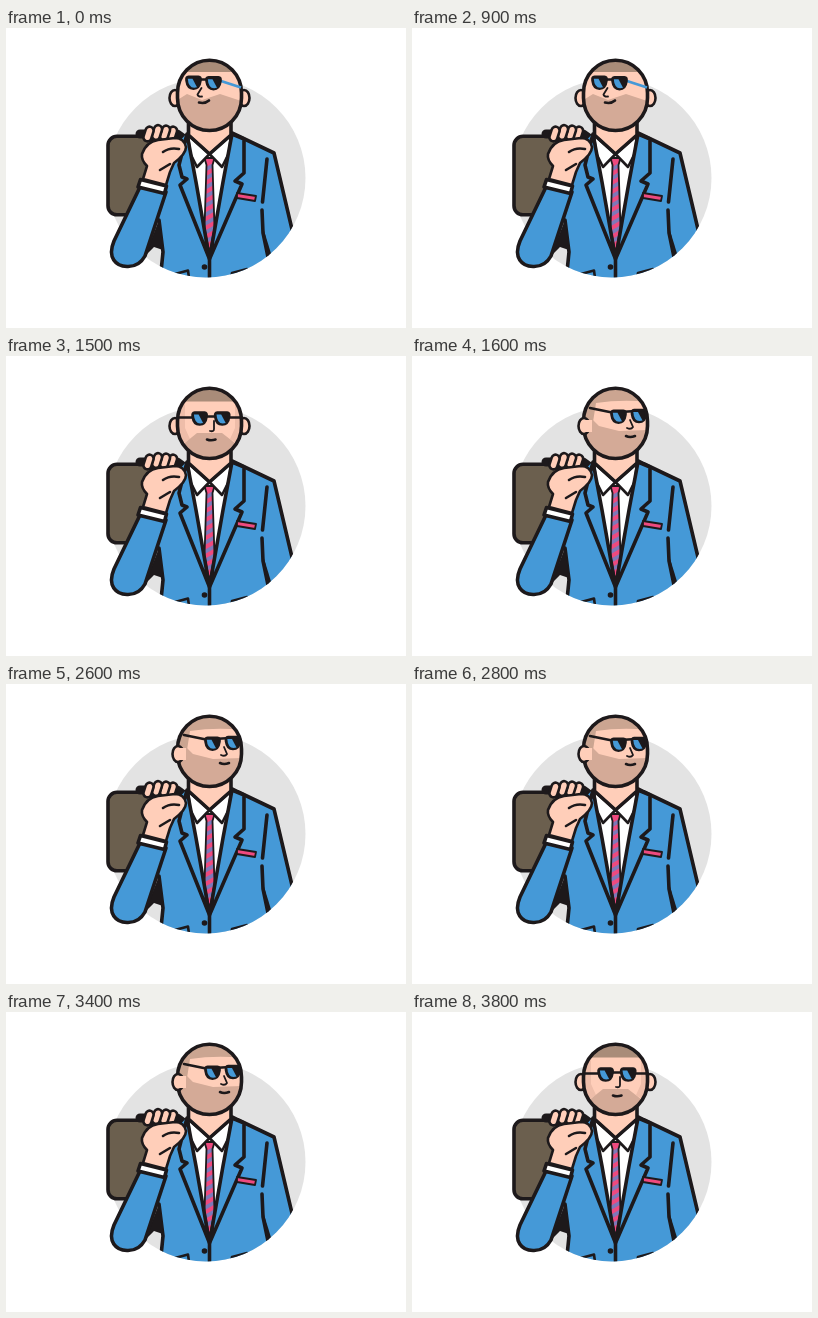
An HTML page for the animation above (3900 ms loop, 400x300 px).

```html
<!DOCTYPE html>
<html lang="en">
<head>
<meta charset="utf-8">
<title>Man in a blue suit</title>
<style>
html, body { margin: 0; width: 100%; height: 100%; overflow: hidden; background: #fff; }
svg { display: block; width: 100vw; height: 100vh; }
.ink { fill: none; stroke: #1d191b; stroke-width: 3.6; stroke-linecap: round; stroke-linejoin: round; }
.thin { stroke-width: 2.6; }
.fine { stroke-width: 1.8; }
.skin { fill: #ffceb9; }
.blue { fill: #4599d7; }
.white { fill: #fff; }
.black { fill: #1d191b; }
.case { fill: #6b5f4e; }
.pink { fill: #ee4a7f; }
.hair { fill: #a98c79; }
.stubble { fill: #cba591; }
.beard { fill: #d4aa97; }
.shade { fill: #eebda9; }
.pose { animation: 3.9s step-end infinite; }
.left { animation-name: left; }
.front { animation-name: front; visibility: hidden; }
.right { animation-name: right; visibility: hidden; }
.nod { animation: nod 3.9s step-end infinite; }
@keyframes left { 0% { visibility: visible } 38.4615%, 100% { visibility: hidden } }
@keyframes front {
  0%, 41.0256% { visibility: hidden }
  38.4615%, 97.4359%, 100% { visibility: visible }
}
@keyframes right {
  0%, 97.4359%, 100% { visibility: hidden }
  41.0256% { visibility: visible }
}
@keyframes nod {
  0%, 71.7949%, 100% { transform: none }
  66.6667% { transform: translateY(-1px) }
}
</style>
</head>
<body>
<svg viewBox="0 0 400 300">
  <defs>
    <path id="torso" d="M150 260V190L166 122L181 105H226L268 125L289 214V260Z"/>
    <path id="tie" d="M198.500 130H208.500L206.500 137L208.500 200L203.500 226L198.500 200L200.500 137Z"/>
    <path id="head" d="M171.500 65A32 32.800 0 0 1 235.500 65V70A32 32.500 0 0 1 171.500 70Z"/>
    <ellipse id="ear" class="ink skin thin" cy="70" rx="5.500" ry="8"/>
    <rect id="finger" class="ink thin skin" x="-4" y="-7.500" width="8" height="15" rx="4" transform="rotate(18)"/>
    <g id="lens">
      <path class="ink black thin" d="M-5 -6H5Q7.500 -6 7 -2Q6 6 0 6Q-6 6 -7 -2Q-7.500 -6 -5 -6Z"/>
      <path class="blue" d="M-5.700 -4H-1L3.500 4.500Q-5 7 -5.700 -4Z"/>
    </g>
    <clipPath id="discClip"><circle cx="200" cy="150" r="99.500"/></clipPath>
    <clipPath id="tieClip"><use href="#tie"/></clipPath>
    <clipPath id="headClip"><use href="#head"/></clipPath>
  </defs>

  <circle cx="200" cy="150" r="99.500" fill="#e3e3e3"/>

  <!-- briefcase -->
  <rect class="ink case" x="102" y="108.300" width="45" height="78.500" rx="9"/>
  <path class="ink" style="stroke-width:9" d="M134 106H171L178 111"/>

  <!-- jacket -->
  <g clip-path="url(#discClip)">
    <path class="blue" d="M154 260L157 224L152 192L166 122L181 105H226L268 125L289 214V260Z"/>
    <path class="ink" d="M226 105L268 125L289 214M261 131L256.500 174M256 182L257 205L263 234"/>
    <path class="black" d="M256 196L267 232L262 238Z"/>
    <path class="ink" d="M153 192L157 224L155 244M203.500 230V250"/>
    <path class="ink thin" d="M169 246L182 242.500L183 250M225 250L226 245L241 241"/>
    <path class="black" d="M153 192L139 228L148 219L157 222Z"/>
  </g>
  <circle class="black" cx="198.500" cy="239" r="2.800"/>

  <!-- shirt and tie -->
  <path class="white" d="M181 106L190 154L203.500 231L217 154L226 106Z"/>
  <path class="skin" d="M182.500 90H225V107L203.500 127L182.500 107Z"/>
  <use href="#tie" class="pink"/>
  <path clip-path="url(#tieClip)" fill="none" stroke="#7f78b8" stroke-width="3.800" d="M197 143L211 135M197 152L211 144M197 161L211 153M197 170L211 162M197 179L211 171M197 188L211 180M197 197L211 189M197 206L211 198M197 215L211 207"/>
  <use href="#tie" class="ink fine"/>
  <path class="ink thin white" d="M182 107L184 125L191 139L203.500 126ZM225 107L223 125L216 139L203.500 126Z"/>
  <path class="ink" d="M182.500 92V107L203.500 126L225 107V92"/>
  <path class="ink blue" d="M181 106L173 137L176 149L181 151L174 157L203.500 231L190 154ZM226 106L238 111V145L229 153L236 156L203.500 231L217 154Z"/>
  <path class="ink fine pink" d="M231 165L250 168L249 173L231 170Z"/>

  <!-- raised arm -->
  <path class="ink blue" d="M134 159L108 213C101 230 110 238 121 238.500Q133 239 139 228L160 164Z"/>
  <path class="ink white" d="M134.500 151.500L160.500 158L158.500 165.500L132 159Z"/>
  <use href="#finger" x="0" y="0" transform="translate(166 106)"/>
  <use href="#finger" transform="translate(159 105)"/>
  <use href="#finger" transform="translate(151 104.500)"/>
  <use href="#finger" transform="translate(142.500 106)"/>
  <path class="ink thin skin" d="M137 151L141 138Q135 132 136 126Q140 114 152 112L169 110Q178 110 180 119Q180 126 168 135L164 144L160 157Z"/>
  <path class="ink thin" d="M157 124Q164 119 173 121M154 142L164 136"/>

  <!-- head turned left -->
  <g class="pose left">
    <use href="#ear" x="169"/>
    <use href="#ear" x="238"/>
    <use href="#head" class="skin"/>
    <g clip-path="url(#headClip)">
      <path class="hair" d="M170 28H238V44H170Z"/>
      <path class="beard" d="M170 73L181 66L196 72L214 66L238 74V105H170Z"/>
    </g>
    <use href="#head" class="ink"/>
    <path fill="none" stroke="#4599d7" stroke-width="2.800" d="M215 53L235 59.500"/>
    <path class="ink thin" d="M194 51.500H202"/>
    <path class="skin" d="M195 61L191 67L196 70L200 62Z"/>
    <path class="ink fine" d="M195.500 60L191.500 66.500Q192 69 196 68.500"/>
    <path class="ink thin" d="M193 74.500Q199 76 203 72.500"/>
    <use href="#lens" x="187.500" y="54.700"/>
    <use href="#lens" x="207.500" y="55.200"/>
  </g>

  <!-- head facing forward -->
  <g class="pose front">
    <use href="#ear" x="169"/>
    <use href="#ear" x="238"/>
    <use href="#head" class="skin"/>
    <g clip-path="url(#headClip)">
      <path class="hair" d="M170 28H238V45.500H170Z"/>
      <path class="shade" d="M170 45H179V72L184 83L170 92ZM238 45H229V72L224 83L238 92Z"/>
      <path class="beard" d="M170 94L191 77H216L238 94V105H170Z"/>
    </g>
    <use href="#head" class="ink"/>
    <path class="ink thin" d="M172 61.500H187M200 60.500H209M223 61.500H236"/>
    <path class="skin" d="M204 66H208V76H203Z"/>
    <path class="ink fine" d="M208 65V73Q208 76 204 75"/>
    <path class="ink thin" d="M201 83.500Q205 85 209.500 83.500"/>
    <use href="#lens" x="193.600" y="62.500"/>
    <use href="#lens" x="216.200" y="62.500"/>
  </g>

  <!-- head turned right -->
  <g class="pose right">
    <use href="#head" class="skin"/>
    <g clip-path="url(#headClip)">
      <path class="stubble" d="M170 28H238V46Q210 43 184 47L181 66H170Z"/>
      <path class="beard" d="M170 64H181L187 70L207 75L238 74V105H170Z"/>
    </g>
    <use href="#head" class="ink"/>
    <use href="#ear" x="172"/>
    <path class="skin" d="M172 64H180V76H172Z"/>
    <g class="nod">
      <path class="skin" d="M212 60H220V74H212Z"/>
      <path class="ink fine" d="M218 64L221 71Q219 74 215 72"/>
      <path class="ink thin" d="M214 80Q218 82 223 80M178 52L200 56.500L232 54.500"/>
      <use href="#lens" x="206.500" y="60.700"/>
      <use href="#lens" x="227" y="60"/>
    </g>
  </g>
</svg>
</body>
</html>
```
